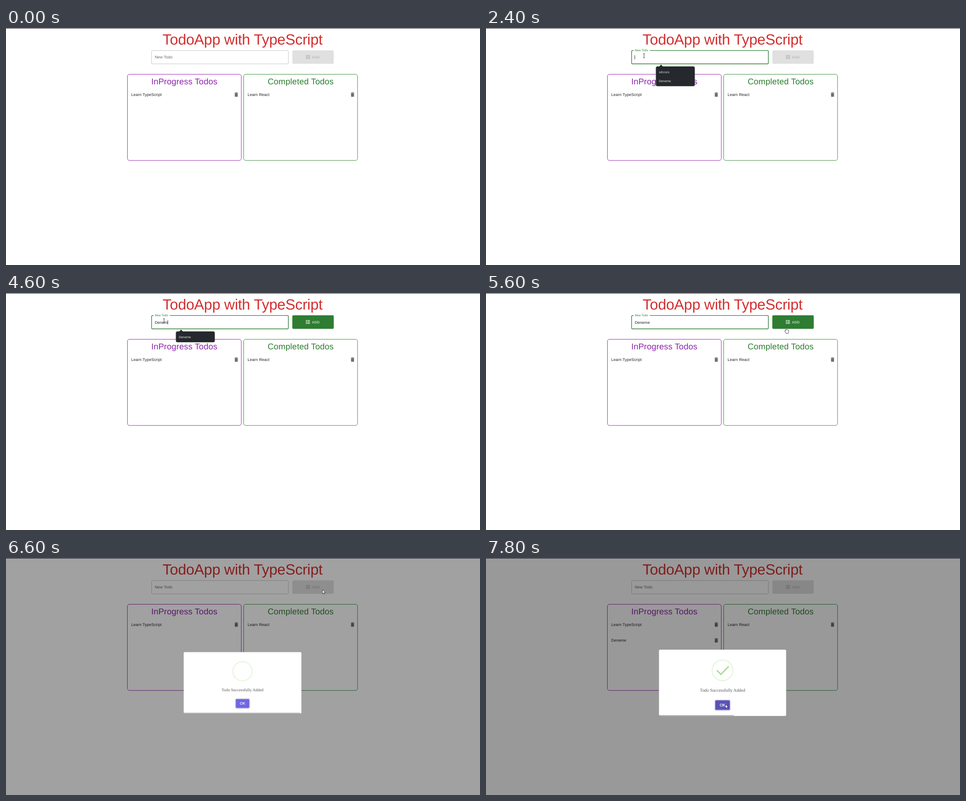
An HTML page for the animation above (8000 ms loop, 1056 by 530 pixels).

```html
<!DOCTYPE html>
<html lang="en">
<head>
<meta charset="utf-8">
<title>Todo app</title>
<style>
html, body { margin: 0; width: 100%; height: 100%; overflow: hidden; background: #fff; }
svg { display: block; width: 100%; height: 100%; }
text { font: 8.8px "Liberation Sans", Arial, sans-serif; letter-spacing: .00938em; text-rendering: geometricPrecision; fill: #1f1f1f; white-space: pre; }
.mid { text-anchor: middle; }
.title { font-size: 33px; letter-spacing: -.00833em; fill: #d32f2f; }
.head { font-size: 18.7px; letter-spacing: .00735em; }
.add { font-size: 7.7px; letter-spacing: .02857em; fill: inherit; }
.hint text { font: 6.8px "Open Sans", "Noto Sans", sans-serif; letter-spacing: 0; fill: #fff; }
.done { font: 9.9px "Liberation Serif", "Times New Roman", serif; letter-spacing: 0; fill: #545454; }
.ok { letter-spacing: 0; fill: #fff; stroke: #fff; stroke-width: .25; }
.card { fill: none; stroke-width: 1; }
.lifted { filter: drop-shadow(0 .8px .8px rgba(0,0,0,.3)); }
</style>
</head>
<body>
<svg viewBox="0 0 1056 530">
  <defs>
    <path id="bin" transform="scale(.55)" fill="#6f6f6f" d="M6 19c0 1.1.9 2 2 2h8c1.1 0 2-.9 2-2V7H6zM19 4h-3.5l-1-1h-5l-1 1H5v2h14z"/>
  </defs>
  <rect width="1056" height="1" fill="#1b1b29"/>
  <text class="title mid" x="527" y="36.5">TodoApp with TypeScript</text>

  <rect id="field" x="324.4" y="50.4" width="304.7" height="29.8" rx="2.2" fill="none"/>
  <rect id="notch" x="329" y="49" width="36" height="3" fill="#fff"/>
  <text id="label">New Todo</text>
  <text id="value" x="331.4" y="68.6"></text>
  <rect id="caret" x="331" y="61" width="1" height="9" fill="#333"/>

  <g id="button">
    <rect id="face" x="638" y="50" width="92" height="30" rx="2.2"/>
    <path transform="translate(667 59.5) scale(.4583)" d="M19 5v14H5V5h14m1.1-2H3.9c-.5 0-.9.4-.9.9v16.2c0 .4.4.9.9.9h16.2c.4 0 .9-.5.9-.9V3.9c0-.5-.5-.9-.9-.9zM11 7h6v2h-6zm0 4h6v2h-6zm0 4h6v2h-6zM7 7h2v2H7zm0 4h2v2H7zm0 4h2v2H7z"/>
    <text class="add" x="681.8" y="67.7">ADD</text>
  </g>

  <rect class="card" x="270.5" y="103.5" width="253.7" height="192.7" rx="4.5" stroke="#9c27b0"/>
  <rect class="card" x="529.5" y="103.5" width="253.7" height="192.7" rx="4.5" stroke="#388e3c"/>
  <text class="head mid" x="397.3" y="125.8" style="fill:#8e24aa">InProgress Todos</text>
  <text class="head mid" x="656.5" y="125.8" style="fill:#2e7d32">Completed Todos</text>
  <text x="279" y="151.7">Learn TypeScript</text>
  <use href="#bin" x="506.4" y="142.2"/>
  <text x="538.2" y="151.7">Learn React</text>
  <use href="#bin" x="765.4" y="142.2"/>
  <g id="item">
    <text x="279" y="187">Deneme</text>
    <use href="#bin" x="506.4" y="177.5"/>
  </g>

  <g id="hints" class="hint lifted">
    <path fill="#25282c" d="M385.5 86.5L390 82L394.5 86.5Z"/>
    <rect id="hintBox" x="378.6" y="86" width="86.4" rx="3.5" fill="#25282c"/>
    <text id="hint1" x="385" y="100.6"></text>
    <text id="hint2" x="385" y="120.5"></text>
  </g>

  <rect id="shade" y="1" width="1056" height="529"/>
  <g id="modal">
    <rect x="385.4" y="205" width="283.2" height="148.3" rx="2.75" fill="#fff"/>
    <circle cx="526.9" cy="251.2" r="23.1" fill="none" stroke="#a5dc86" stroke-opacity=".3" stroke-width="2.2"/>
    <path id="check" d="M514.2 251L523.3 260.3L540.8 242.2" fill="none" stroke="#a5dc86" stroke-width="2.75" pathLength="100"/>
    <text class="done mid" x="527" y="299.2">Todo Successfully Added</text>
    <rect x="510.2" y="317.8" width="33.6" height="22.6" rx="3" fill="none" stroke="#7066e0" stroke-opacity=".5" stroke-width="1.65"/>
    <rect id="okFace" x="511" y="318.6" width="32" height="21" rx="2.2"/>
    <text class="ok mid" x="527" y="332.2">OK</text>
    <rect id="timer" x="385.4" y="351.1" height="2.2" fill-opacity=".25"/>
  </g>

  <g id="beam" fill="none" stroke="#222" stroke-width=".9">
    <path d="M-2 -4.6H-.6L0 -4L.6 -4.6H2M0 -4V4M-2 4.6H-.6L0 4L.6 4.6H2"/>
  </g>
  <path id="arrow" fill="#fff" stroke="#222" stroke-width=".8" stroke-linejoin="round" d="M0 0V9.2L2.1 7.3L3.5 10.4L4.9 9.8L3.6 6.7H6.4Z"/>
  <path id="hand" fill="#fff" stroke="#222" stroke-width=".8" stroke-linejoin="round" d="M-1 .8Q0 -.6 1 .8V4.4Q2 3.7 2.7 4.7Q3.7 4.2 4.3 5.2Q5.6 4.9 5.7 6.2V8.6Q5.6 10 4.8 11V12.6H-.6V11.4L-3.2 7.8Q-3.4 6.3 -2.2 6.5L-1 7.6Z"/>
</svg>

<script>
const LOOP = 8000, TIMER_START = 6570, TIMER_LENGTH = 3000;
const GREEN = "#2e7d32", GRAY = "#c2c2c2";
const $ = id => document.getElementById(id);

const initial = {
  border: GRAY, weight: 1, float: 0, label: "#666", value: "", caret: false,
  face: "#e0e0e0", ink: "#a9a9a9", lifted: false, hints: [], item: false,
  shade: 0, scale: 0, check: 0, ok: "#7066e0", cursor: "", x: 0, y: 0
};
const at = (cursor, x, y) => ({ cursor, x, y });

// Each step changes only the listed properties.
const steps = [
  [0, {}],
  [390, at("arrow", 314.4, 167.5)],
  [580, at("arrow", 330, 108)],
  [770, { ...at("beam", 350, 52), border: "#333" }],
  [970, at("beam", 352, 62)],
  [1370, { border: GREEN, weight: 1.4, label: GREEN, float: .5, caret: true }],
  [1570, { float: 1 }],
  [1770, { caret: false, hints: ["sdccxcs", "Deneme"] }],
  [2400, { caret: true }],
  [2780, { value: "D", face: "#87ae89", ink: "#d4d4d4", hints: ["Deneme"] }],
  [2980, { value: "De", face: GREEN, ink: "#fff", lifted: true }],
  [3190, {}],
  [3580, { caret: false }],
  [3980, { value: "Den", caret: true }],
  [4190, { value: "Dene" }],
  [4600, { value: "Denem" }],
  [4800, { value: "Deneme", hints: [] }],
  [5000, { caret: false }],
  [5200, at("beam", 410, 70)],
  [5400, at("arrow", 572, 86)],
  [5600, at("hand", 668.7, 77.7)],
  [5790, { ...at("hand", 692, 73), face: "#1f6424" }],
  [6000, { ...at("hand", 705, 70.8), face: "#1b5e20", border: GRAY, weight: 1, label: "#666" }],
  [6200, { ...at("arrow", 705, 70.8), value: "", float: 0, face: "#a8bda9", ink: "#c8cec8", lifted: false }],
  [6410, { face: "#dde0de", ink: "#a9afaa" }],
  [6600, { shade: .37, scale: .926, face: "#e0e0e0", ink: "#a9a9a9" }],
  [6820, { shade: .4, scale: 1 }],
  [7010, { item: true, check: 15 }],
  [7210, { ...at("arrow", 655, 190), check: 95 }],
  [7410, { ...at("arrow", 560, 312), check: 100 }],
  [7600, { ...at("arrow", 533.5, 327), ok: "#655cca" }],
  [7800, { ok: "#5a52b3" }]
];

let last = { ...initial };
const states = steps.map(([time, change]) => last = { ...last, ...change, time });

const set = (id, attrs) => {
  for (const key in attrs) $(id).setAttribute(key, attrs[key]);
};
const show = (id, on) => $(id).style.display = on ? "" : "none";
const mix = (a, b, k) => a + (b - a) * k;

function draw(s) {
  set("field", { stroke: s.border, "stroke-width": s.weight });
  show("notch", s.float > 0);
  set("label", { transform: `translate(331.4 ${mix(68.2, 52.2, s.float)}) scale(${mix(1, .75, s.float)})` });
  $("label").style.fill = s.label;

  $("value").textContent = s.value;
  const width = s.value ? $("value").getComputedTextLength() : 0;
  set("caret", { x: Math.floor(331.4 + width) });
  show("caret", s.caret);

  set("face", { fill: s.face, class: s.lifted ? "lifted" : "" });
  set("button", { fill: s.ink });

  const [first = "", second = ""] = s.hints;
  show("hints", first);
  $("hint1").textContent = first;
  $("hint2").textContent = second;
  set("hintBox", { height: second ? 44 : 24 });

  show("item", s.item);
  set("shade", { "fill-opacity": s.shade });
  show("modal", s.scale);
  set("modal", { transform: `translate(527 279.1) scale(${s.scale}) translate(-527 -279.1)` });
  show("check", s.check);
  set("check", { "stroke-dasharray": `${s.check} 200` });
  set("okFace", { fill: s.ok });
  const left = 1 - Math.max(0, s.time - TIMER_START) / TIMER_LENGTH;
  set("timer", { width: 283.2 * left });

  for (const id of ["beam", "arrow", "hand"]) {
    show(id, s.cursor === id);
    set(id, { transform: `translate(${s.x} ${s.y})` });
  }
}

const start = performance.now();
let shown;
function tick() {
  const t = (performance.now() - start) % LOOP;
  const state = states.findLast(s => s.time <= t);
  if (state !== shown) draw(shown = state);
  requestAnimationFrame(tick);
}
tick();
</script>
</body>
</html>
```
